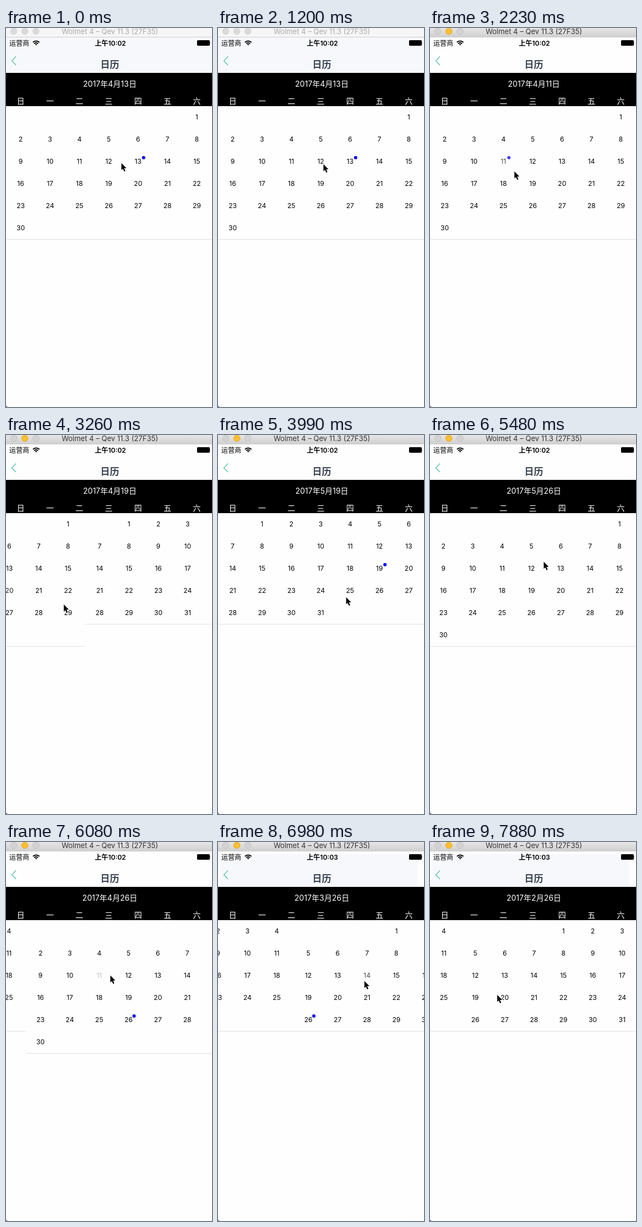
An HTML page for the animation above (8000 ms loop, 372 by 684 pixels).

```html
<!DOCTYPE html>
<html lang="zh">
<head>
<meta charset="utf-8">
<title>日历</title>
<style>
html, body { margin: 0; width: 100%; height: 100%; overflow: hidden; background: #fefefe; }
svg { display: block; width: 100vw; height: 100vh; }
text { font-family: Inter, "Noto Sans CJK SC", "Noto Sans CJK", sans-serif; white-space: pre; }
.mid { text-anchor: middle; }
.day { font-size: 12px; }
.head { font-size: 14px; fill: #fff; }
</style>
</head>
<body>
<svg id="stage" viewBox="0 0 372 684">
  <defs>
    <linearGradient id="chrome" x2="0" y2="1">
      <stop offset="0" stop-color="#e6e6e6"/><stop offset="1" stop-color="#d0d0d0"/>
    </linearGradient>
  </defs>
  <rect width="372" height="684" fill="#fefefe"/>
  <g id="pages"></g>

  <rect y="17" width="372" height="64" fill="#fefefe"/>
  <rect id="tint" fill="#f7f8fc"/>
  <rect id="bar" width="372" height="16"/>
  <rect y="16" width="372" height="1" fill="#cdcdcd"/>
  <g id="lights" stroke-width=".8"></g>
  <text id="caption" class="mid" x="187.5" y="11" font-size="13">Wolmet 4 – Qev 11.3 (27F35)</text>

  <text x="6" y="31.5" font-size="12">运营商</text>
  <g transform="translate(54.5 31.5)" fill="none" stroke="#000" stroke-width="1.9">
    <path d="M-5.9-5.6A8.3 8.3 0 0 1 5.9-5.6M-3.6-3.2A4.9 4.9 0 0 1 3.6-3.2"/>
    <path d="M0 0L-1.9-1.9A2.7 2.7 0 0 1 1.9-1.9Z" fill="#000" stroke="none"/>
  </g>
  <text id="clock" class="mid" x="188.5" y="31.5" font-size="12" font-weight="600"></text>
  <rect x="345" y="22" width="23" height="10" rx="1.8"/>
  <path d="M368.6 25.5q1.4 1.5 0 3z"/>

  <path d="M18 51.5L10.5 59.2L18 67" fill="none" stroke="#48bf9e" stroke-width="1.2"/>
  <text class="mid" x="187.5" y="71.5" font-size="17" font-weight="600" fill="#3a4452">日历</text>
  <rect y="81" width="372" height="60"/>
  <text id="date" class="mid head" x="187.5" y="106"></text>
  <g id="weekdays"></g>

  <path d="M0 680Q0 684 4 684H0Z" fill="#444"/>
  <path id="cursor" d="M.4 .8V13.6L3.2 10.9L5.4 16L7.6 15L5.4 10.1H9.4Z" stroke="#fff" stroke-width="1.4" paint-order="stroke"/>
</svg>
<script>
const LOOP = 8000, TICK = 148.5, LEAD = 24, LAST = 53;
const PITCH = 375, COL = 53, ROW = 40, TOP = 141, BASE_MONTH = 4;
const ACTIVE_TICK = 9, MINUTE_TICK = 42, SETTLE = 3.8;

// Taps select a day; gestures with a turn swipe to a neighbouring month.
// "at" is in ticks, "tip" is where the pointer ends up.
const GESTURES = [
  { at: 14.13, month: 4, day: 11, tip: [152, 258] },
  { at: 18.1, month: 4, day: 19 },
  { at: 20.87, month: 4, day: 20, turn: 1, tip: [104, 305] },
  { at: 31.1, month: 5, day: 26 },
  { at: 33.44, month: 5, day: 17, turn: -1, tip: [283, 208] },
  { at: 40.43, month: 4, day: 11, turn: -1, tip: [188, 240] },
  { at: 46.13, month: 3, day: 14, turn: -1, tip: [264, 250] },
  { at: 51.45, month: 2, day: 23, turn: 1, tip: [121, 275] },
];

const $ = id => document.getElementById(id);
const set = (node, attrs) => {
  for (const key in attrs) node.setAttribute(key, attrs[key]);
  return node;
};
const add = (parent, tag, attrs, text = '') => {
  const node = set(document.createElementNS('http://www.w3.org/2000/svg', tag), attrs);
  node.textContent = text;
  return parent.appendChild(node);
};

const colX = col => (col + .5) * COL;
const firstSlot = month => new Date(2017, month - 1, 1).getDay();
const dayCount = month => new Date(2017, month, 0).getDate();
const cellCentre = (month, day) => {
  const slot = firstSlot(month) + day - 1;
  return [colX(slot % 7), TOP + (Math.floor(slot / 7) + .5) * ROW];
};

const pages = {}, days = {};
for (let month = 2; month <= 5; month++) {
  const page = pages[month] = add($('pages'), 'g', {});
  for (let day = 1; day <= dayCount(month); day++) {
    const cell = days[month + '/' + day] =
      add(page, 'g', { transform: `translate(${cellCentre(month, day)})` });
    add(cell, 'text', { class: 'mid day', y: 4.4 }, day);
  }
  const rows = Math.ceil((firstSlot(month) + dayCount(month)) / 7);
  add(page, 'rect', { y: TOP + rows * ROW, width: PITCH, height: 1, fill: '#e1e1e1' });
}
const dot = add($('pages'), 'circle', { cx: 10, cy: -7, r: 3, fill: '#00f' });
[...'日一二三四五六'].forEach((name, col) =>
  add($('weekdays'), 'text', { class: 'mid head', x: colX(col), y: 137 }, name));
const lights = [14, 34, 54].map(cx => add($('lights'), 'circle', { cx, cy: 6, r: 5.8 }));

// Slow drag, quick flick, long settling tail.
const swipe = age => age <= 0 ? 0 : age >= SETTLE ? 1 : age ** 4 / (1 + age ** 4);
// A touched cell dims at once and recovers after release.
const touchOpacity = age => age < -1.2 ? 1 : 1 - .8 * Math.exp(-3.3 * Math.max(0, age - .55));

// The pointer rests on each cell before the touch and then goes to its tip.
const pointerPath = [[0, 208, 243], [3, 201, 245], [6, 201, 245]];
for (const { at, month, day, tip } of GESTURES) {
  const [x, y] = cellCentre(month, day);
  const grab = [x + 8, y + 4];
  pointerPath.push([at - .8, ...grab], [at, ...grab], [Math.ceil(at + .5), ...(tip || grab)]);
}

function pointerAt(tick) {
  const next = pointerPath.findIndex(point => point[0] > tick);
  if (next < 0) return pointerPath.at(-1).slice(1);
  const [t0, ...from] = pointerPath[next - 1], [t1, ...to] = pointerPath[next];
  const k = (tick - t0) / (t1 - t0), ease = k * k * (3 - 2 * k);
  return from.map((v, i) => v + (to[i] - v) * ease);
}

function calendarAt(tick) {
  const state = { month: BASE_MONTH, day: 13, scroll: 0 };
  for (const { at, day, turn } of GESTURES) {
    const age = tick - at;
    if (turn) {
      state.scroll += turn * PITCH * swipe(age);
      if (age >= SETTLE) state.month += turn;
    } else if (age >= -.2) state.day = day;
  }
  return state;
}

function drawChrome(tick) {
  const active = tick >= ACTIVE_TICK, late = tick >= MINUTE_TICK;
  set($('bar'), { fill: active ? 'url(#chrome)' : '#f6f6f6' });
  set($('caption'), { fill: active ? '#333' : '#aaa' });
  lights.forEach((light, i) => {
    const amber = active && i === 1;
    set(light, { fill: amber ? '#fdbf2f' : active ? '#d3d3d3' : '#dadada',
      stroke: amber ? '#e0a023' : active ? '#bdbdbd' : '#d0d0d0' });
  });
  set($('tint'), late ? { x: 4, y: 22, width: 356, height: 59 }
    : { x: 0, y: 17, width: 372, height: active ? 0 : 64 });
  $('clock').textContent = late ? '上午10:03' : '上午10:02';
}

function draw(tick) {
  drawChrome(tick);
  const { month, day, scroll } = calendarAt(tick);
  for (const m in pages)
    set(pages[m], { transform: `translate(${(m - BASE_MONTH) * PITCH - scroll})` });
  $('date').textContent = `2017年${month}月${day}日`;
  days[month + '/' + day].append(dot);

  for (const key in days) set(days[key], { opacity: 1 });
  for (const g of GESTURES)
    if (tick > g.at - 1.2) set(days[g.month + '/' + g.day], { opacity: touchOpacity(tick - g.at) });
  set($('cursor'), { transform: `translate(${pointerAt(tick).map(Math.round)})` });
}

let shown = -1;
const start = performance.now();
function loop() {
  const time = (performance.now() - start) % LOOP;
  const tick = Math.min(LAST, Math.floor((time + LEAD) / TICK));
  if (tick !== shown) draw(shown = tick);
  requestAnimationFrame(loop);
}
loop();
</script>
</body>
</html>
```
